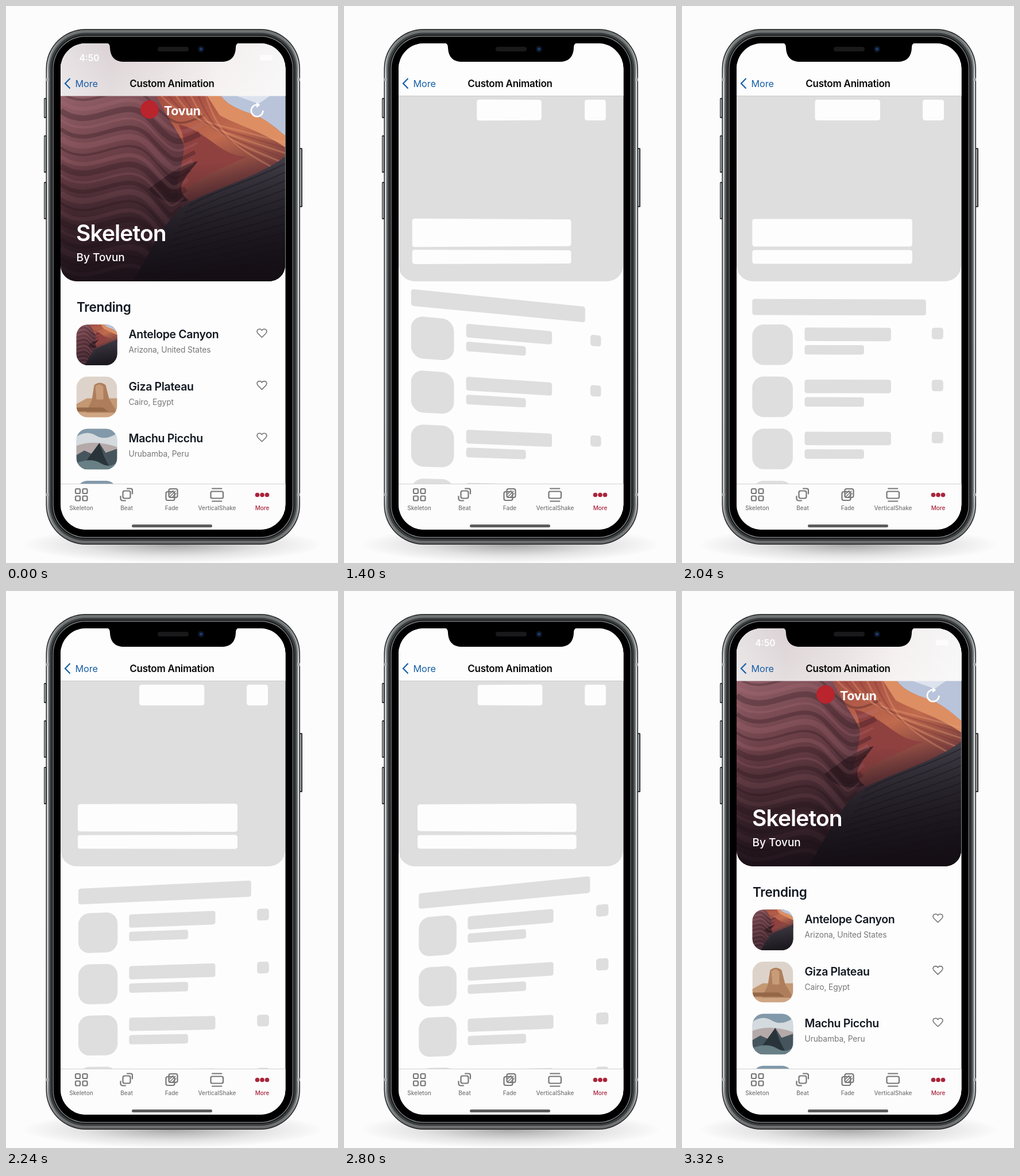
An HTML page for the animation above (6 s loop, 578x969 px).

```html
<!DOCTYPE html>
<html lang="en">
<head>
<meta charset="utf-8">
<title>Skeleton loading</title>
<style>
html, body { margin: 0; width: 100%; height: 100%; overflow: hidden; background: #fcfcfc; }
svg { display: block; width: 100%; height: 100%; }
text { font-family: Inter, Roboto, sans-serif; }
.mid { text-anchor: middle; }
.tab { font-size: 10px; font-weight: 500; fill: #767676; text-anchor: middle; }
.name { font-size: 19.5px; font-weight: 600; letter-spacing: -.35px; fill: #111821; }
.place { font-size: 13.8px; letter-spacing: -.1px; fill: #777; }
.icon { fill: none; stroke: #777; stroke-width: 2.2; stroke-linecap: round; stroke-linejoin: round; }
</style>
</head>
<body>
<svg viewBox="0 0 578 969" xmlns="http://www.w3.org/2000/svg">
  <defs>
    <clipPath id="screen"><rect x="95" y="65" width="391.5" height="846" rx="44"/></clipPath>
    <clipPath id="hero"><path d="M95 156H486V451a28 28 0 0 1-28 28H123a28 28 0 0 1-28-28Z"/></clipPath>
    <clipPath id="thumb"><rect width="71" height="71" rx="20"/></clipPath>
    <linearGradient id="rock" x2=".5" y2="1">
      <stop stop-color="#94616a"/><stop offset=".35" stop-color="#6a3e46"/><stop offset="1" stop-color="#36222b"/>
    </linearGradient>
    <linearGradient id="glow" x1="0" y1="0" x2=".4" y2="1">
      <stop stop-color="#a44d43"/><stop offset=".5" stop-color="#c06a4e"/><stop offset="1" stop-color="#603038"/>
    </linearGradient>
    <linearGradient id="dune" x2=".2" y2="1">
      <stop stop-color="#494550"/><stop offset="1" stop-color="#1c191f"/>
    </linearGradient>
    <linearGradient id="shade" x2="0" y2="1">
      <stop offset=".35" stop-color="#120b12" stop-opacity="0"/><stop offset="1" stop-color="#120b12" stop-opacity=".8"/>
    </linearGradient>
    <linearGradient id="navTint">
      <stop stop-color="#dcd6d8"/><stop offset=".22" stop-color="#cfc3c6"/><stop offset=".45" stop-color="#ddd2d2"/>
      <stop offset=".7" stop-color="#efe9e7"/><stop offset="1" stop-color="#f4f3f4"/>
    </linearGradient>
    <linearGradient id="navFade" x2="0" y2="1">
      <stop stop-color="#fff" stop-opacity=".25"/><stop offset="1" stop-color="#fff" stop-opacity=".45"/>
    </linearGradient>
    <linearGradient id="metal" x2="0" y2="1">
      <stop stop-color="#6d7170"/><stop offset=".1" stop-color="#d9dcdc"/><stop offset=".9" stop-color="#d0d3d3"/><stop offset="1" stop-color="#666"/>
    </linearGradient>
    <radialGradient id="shadow">
      <stop stop-color="#000" stop-opacity=".34"/><stop offset=".6" stop-color="#000" stop-opacity=".1"/><stop offset="1" stop-color="#000" stop-opacity="0"/>
    </radialGradient>
    <g id="canyon">
      <path d="M95 156H486V480H95Z" fill="url(#rock)"/>
      <path d="M372 156H486V226L440 192 400 182Z" fill="#b9c4da"/>
      <path d="M400 156h60l-20 14Z" fill="#dde3ee"/>
      <path d="M262 156H374C385 172 405 180 428 188 452 196 470 212 486 226V300C440 318 370 330 318 340 280 320 330 280 312 246 300 216 280 196 262 156Z" fill="url(#glow)"/>
      <path d="M350 156H374C385 172 405 180 428 188 452 196 470 212 486 226V246C450 220 400 206 372 190Z" fill="#dd8f63"/>
      <path d="M300 206C350 216 372 262 420 262 372 284 330 300 300 330 290 300 326 252 300 206Z" fill="#8f4140"/>
      <path d="M248 318C280 296 300 278 334 270 314 296 290 318 318 338 290 346 264 340 248 318Z" fill="#2f1a20" opacity=".75"/>
      <g id="strata" fill="none"/>
      <path d="M486 262C440 296 380 312 326 338 280 362 262 410 220 480H486Z" fill="url(#dune)"/>
      <g id="ripples" fill="none" stroke="#17141a" stroke-opacity=".45"/>
    </g>
  </defs>

  <rect width="578" height="969" fill="#fcfcfc"/>
  <ellipse cx="290" cy="937" rx="262" ry="32" fill="url(#shadow)"/>
  <g id="body"></g>
  <g clip-path="url(#screen)">
    <rect x="95" y="65" width="392" height="846" fill="#fdfdfd"/>
    <g id="content">
      <g clip-path="url(#hero)">
        <use href="#canyon"/>
        <rect x="95" y="156" width="391" height="324" fill="url(#shade)"/>
      </g>
      <circle cx="250" cy="180" r="16" fill="#b9242d"/>
      <text x="275" y="190" font-size="21.5" font-weight="700" letter-spacing="-.3" fill="#fff">Tovun</text>
      <path d="M447.500 182a10.300 10.300 0 1 1-10.300-10.300" fill="none" stroke="#fff" stroke-width="2.600"/>
      <path d="M436 167.500v9.500l6.500-4.700Z" fill="#fff"/>
      <text x="122" y="409" font-size="39" font-weight="600" letter-spacing="-.9" fill="#fff">Skeleton</text>
      <text x="122.500" y="444" font-size="19" font-weight="500" fill="#fff">By Tovun</text>
      <text x="123" y="532" font-size="22.500" font-weight="600" letter-spacing="-.3" fill="#111821">Trending</text>
      <g id="rows"></g>
    </g>
    <g id="skeleton" fill="#dedede">
      <path d="M95 156H486V451a28 28 0 0 1-28 28H123a28 28 0 0 1-28-28Z"/>
    </g>
    <rect x="95" y="65" width="392" height="91" fill="#fdfdfd"/>
    <g id="tint">
      <rect x="95" y="65" width="392" height="91.500" fill="url(#navTint)"/>
      <rect x="95" y="65" width="392" height="91.500" fill="url(#navFade)"/>
      <text x="127.500" y="95.500" font-size="15.500" font-weight="600" fill="#fff">4:50</text>
      <rect x="442" y="85" width="22" height="10" rx="3" fill="#fff" opacity=".75"/>
    </g>
    <path id="navLine" d="M95 156.500H487" stroke="#c9c9c9"/>
    <path d="M111.500 126l-8.500 8.700 8.500 8.700" fill="none" stroke="#175fa6" stroke-width="2.200"/>
    <text x="120.500" y="140.500" font-size="16.300" letter-spacing="-.1" fill="#175fa6">More</text>
    <text class="mid" x="289" y="140.500" font-size="17" font-weight="600" letter-spacing="-.25" fill="#080808">Custom Animation</text>

    <rect x="95" y="831" width="392" height="80" fill="#fcfcfc"/>
    <path d="M95 831.500H487" stroke="#d2d2d2"/>
    <g class="icon">
      <path d="M123 840h4a2 2 0 0 1 2 2v4a2 2 0 0 1-2 2h-4a2 2 0 0 1-2-2v-4a2 2 0 0 1 2-2Z" id="cell"/>
      <use href="#cell" x="12.500"/><use href="#cell" y="12.500"/><use href="#cell" x="12.500" y="12.500"/>
      <rect x="203.500" y="843.500" width="13" height="13" rx="3"/>
      <path d="M211 839.500h6a3 3 0 0 1 3 3v6M199.500 853v4a3.500 3.500 0 0 0 3.500 3.500h5"/>
      <rect x="278.500" y="845" width="15" height="15" rx="3"/>
      <rect x="283.500" y="840" width="15" height="15" rx="3"/>
      <path d="M285 849l6-6M285 854l10-10M290 854l6-6" stroke-width="1.600"/>
      <rect x="356.500" y="844.500" width="21.500" height="12" rx="2.500"/>
      <path d="M359 839.500h16.500M359 861.500h16.500" stroke-width="1.900"/>
    </g>
    <g fill="#a9243a"><circle cx="437.500" cy="850.500" r="3.800"/><circle cx="446" cy="850.500" r="3.800"/><circle cx="454.500" cy="850.500" r="3.800"/></g>
    <text class="tab" x="131" y="877">Skeleton</text>
    <text class="tab" x="210" y="877">Beat</text>
    <text class="tab" x="288.500" y="877">Fade</text>
    <text class="tab" x="367.500" y="877">VerticalShake</text>
    <text class="tab" x="446" y="877" style="fill:#a9243a">More</text>
    <rect x="219" y="902" width="140" height="5" rx="2.500" fill="#5c5c5c"/>
  </g>
  <path d="M172 64C179 64 181 67 181 73 182 89 190 97 206 97H375C391 97 399 89 400 73 400 67 402 64 409 64Z" fill="#000"/>
  <rect x="264" y="71" width="54" height="8" rx="4" fill="#19191b"/>
  <circle cx="339.500" cy="75" r="5.500" fill="#0c1524"/>
  <circle cx="339.500" cy="75" r="2.500" fill="#1c3c70"/>
</svg>
<script>
const $ = id => document.getElementById(id);
const add = (id, markup) => $(id).insertAdjacentHTML('beforeend', markup);
const range = (n, f) => Array.from({ length: n }, (_, i) => f(i)).join('');
const ROW = 90.6;

// Phone: side buttons, then nested rims from the outside in
const button = (x, y, h) =>
  `<rect x="${x}" y="${y}" width="5" height="${h}" rx="1.500" fill="#2c2e2f"/>` +
  `<rect x="${x + 1.2}" y="${y + 2}" width="1.800" height="${h - 4}" fill="#b9bcbc"/>`;
add('body', button(66, 160, 35) + button(66, 225, 65) + button(66, 306, 65) + button(511, 247, 103));
const rims = [[0, '#232526'], [1.5, 'url(#metal)'], [4, '#707475'], [6.5, '#3b3e3f'], [10, '#17191a'],
  [12, '#8b8f90'], [13.2, '#000']];
add('body', rims.map(([d, fill]) =>
  `<rect x="${69.5 + d}" y="${40 + d}" width="${442.5 - 2 * d}" height="${897 - 2 * d}" rx="${69 - d}" fill="${fill}"/>`).join(''));
add('body', [128, 850].map(y =>
  `<path d="M69.500 ${y}h5M507 ${y}h5" stroke="#a9adad" stroke-width="5"/>`).join(''));

// Rock layers
add('strata', range(20, i => {
  const y = 150 + i * 16;
  return `<path d="M95 ${y}C150 ${y + 42} 205 ${y - 34} 250 ${y + 14}S${300 - i * 2} ${y + 60} ${345 - i * 4} ${y + 40}"
    stroke="${i % 2 ? '#b3747a' : '#2a151d'}" stroke-width="${4 + i % 3 * 3}" stroke-opacity="${i % 2 ? .22 : .3}"/>`;
}));
add('strata', range(7, i =>
  `<path d="M${270 + i * 13} 156C${310 + i * 10} ${200 + i * 4} ${350 + i * 8} ${200 + i * 8} 486 ${238 + i * 9}"
    stroke="${i % 2 ? '#7d3636' : '#eaa277'}" stroke-width="3" stroke-opacity=".35"/>`));
add('ripples', range(12, i =>
  `<path d="M486 ${274 + i * 15}C430 ${304 + i * 13} 370 ${318 + i * 13} ${318 - i * 6} ${348 + i * 12}" stroke-width="2"/>`));

// List
const peaks = `<path d="M0 0H71V71H0Z" fill="#8299aa"/>
  <path d="M0 14Q18 2 34 12T71 8V34H0Z" fill="#d4dade"/><path d="M0 30Q30 18 71 32V46H0Z" fill="#b5a9a9"/>
  <path d="M0 46L14 38 27 44 40 25 51 42 71 35V71H0Z" fill="#46555d"/><path d="M20 52L40 25 48 48 60 71H8Z" fill="#29343a"/>
  <path d="M0 60Q25 50 42 60T71 58V71H0Z" fill="#687f86"/>`;
const giza = `<path d="M0 0H71V71H0Z" fill="#ddd3ca"/><path d="M0 48L18 38H71V71H0Z" fill="#c39873"/>
  <path d="M27 41L31 15Q41 7 51 15L57 39 68 57V64H16Z" fill="#ae7e5c"/>
  <path d="M33 17Q41 10 47 18V40H35Z" fill="#c89c79"/><path d="M0 54H46L56 61H0Z" fill="#936748"/><path d="M0 63H71V71H0Z" fill="#d0a583"/>`;
const canyon = '<use href="#canyon" transform="translate(-34 -34) scale(.22)"/>';
const rows = [
  [canyon, 'Antelope Canyon', 'Arizona, United States'],
  [giza, 'Giza Plateau', 'Cairo, Egypt'],
  [peaks, 'Machu Picchu', 'Urubamba, Peru'],
  [peaks, '', '']
];
add('rows', rows.map(([art, name, place], i) => `<g transform="translate(0 ${i * ROW})">
  <g transform="translate(122.500 554)" clip-path="url(#thumb)">${art}</g>
  <text class="name" x="213.500" y="578">${name}</text>
  <text class="place" x="213.500" y="603">${place}</text>
  <path d="M445.500 576.500L439 570C435 565.500 438 562 441.500 562 443.500 562 444.800 563 445.500 564.500 446.200 563 447.500 562 449.500 562 453 562 456 565.500 452 570Z"
    fill="none" stroke="#777" stroke-width="1.600" stroke-linejoin="round"/></g>`).join(''));

// Skeleton blocks: each header block turns about its own centre, the list turns as one
const DEPTH = 521, SWING = .13;
const blocks = [];
function block(x, y, w, h, r, pivot, fill) {
  const el = document.createElementNS('http://www.w3.org/2000/svg', 'path');
  if (fill) el.setAttribute('fill', fill);
  $('skeleton').append(el);
  blocks.push({ el, x, y, w, h, r, pivot: pivot || [x + w / 2, y + h / 2] });
}
[[231.5, 163, 113.5, 36], [419, 163, 37, 36], [122.5, 370.5, 278.5, 48], [122.5, 424.5, 278.5, 24]]
  .forEach(b => block(...b, 4, null, '#fdfdfd'));
const list = [290.5, 930];
block(122.5, 510, 302.5, 28, 4, list);
rows.forEach((_, i) => {
  const y = i * ROW;
  block(122.5, 554.3, 70.5, 70.5, 20, list);
  block(213.5, 559.5, 150.5, 23.5, 4, list);
  block(213.5, 590, 103.5, 16.5, 4, list);
  block(435, 559.3, 20, 20, 4.5, list);
  blocks.slice(-4).forEach(b => { b.y += y; });
});

function outline({ x, y, w, h, r, pivot: [cx, cy] }, angle) {
  const sin = Math.sin(angle) / DEPTH, cos = Math.cos(angle);
  const p = (px, py) => {
    const dx = px - cx, s = 1 / (1 + dx * sin);
    return `${(cx + dx * cos * s).toFixed(2)} ${(cy + (py - cy) * s).toFixed(2)} `;
  };
  const X = x + w, Y = y + h, c = r * .45;
  return 'M' + p(x + r, y) + 'L' + p(X - r, y) + 'C' + p(X - c, y) + p(X, y + c) + p(X, y + r) +
    'L' + p(X, Y - r) + 'C' + p(X, Y - c) + p(X - c, Y) + p(X - r, Y) +
    'L' + p(x + r, Y) + 'C' + p(x + c, Y) + p(x, Y - c) + p(x, Y - r) +
    'L' + p(x, y + r) + 'C' + p(x, y + c) + p(x + c, y) + p(x + r, y) + 'Z';
}

const START = 1000, END = 3320, LOOP = 6000, STEP = 40;
const swing = t => t < 2050
  ? SWING * Math.sin(Math.PI * (t - 940) / 1110)
  : -SWING * Math.sin(Math.PI * (t - 2050) / 1260);

function draw(time) {
  const t = Math.floor(time % LOOP / STEP) * STEP;
  const loading = t >= START && t < END;
  const show = (id, on) => { $(id).style.display = on ? '' : 'none'; };
  show('content', !loading);
  show('tint', !loading);
  show('skeleton', loading);
  show('navLine', loading);
  if (loading) {
    const angle = swing(t);
    blocks.forEach(b => b.el.setAttribute('d', outline(b, angle)));
  }
}

const origin = performance.now();
(function tick() {
  draw(performance.now() - origin);
  requestAnimationFrame(tick);
})();
</script>
</body>
</html>
```
